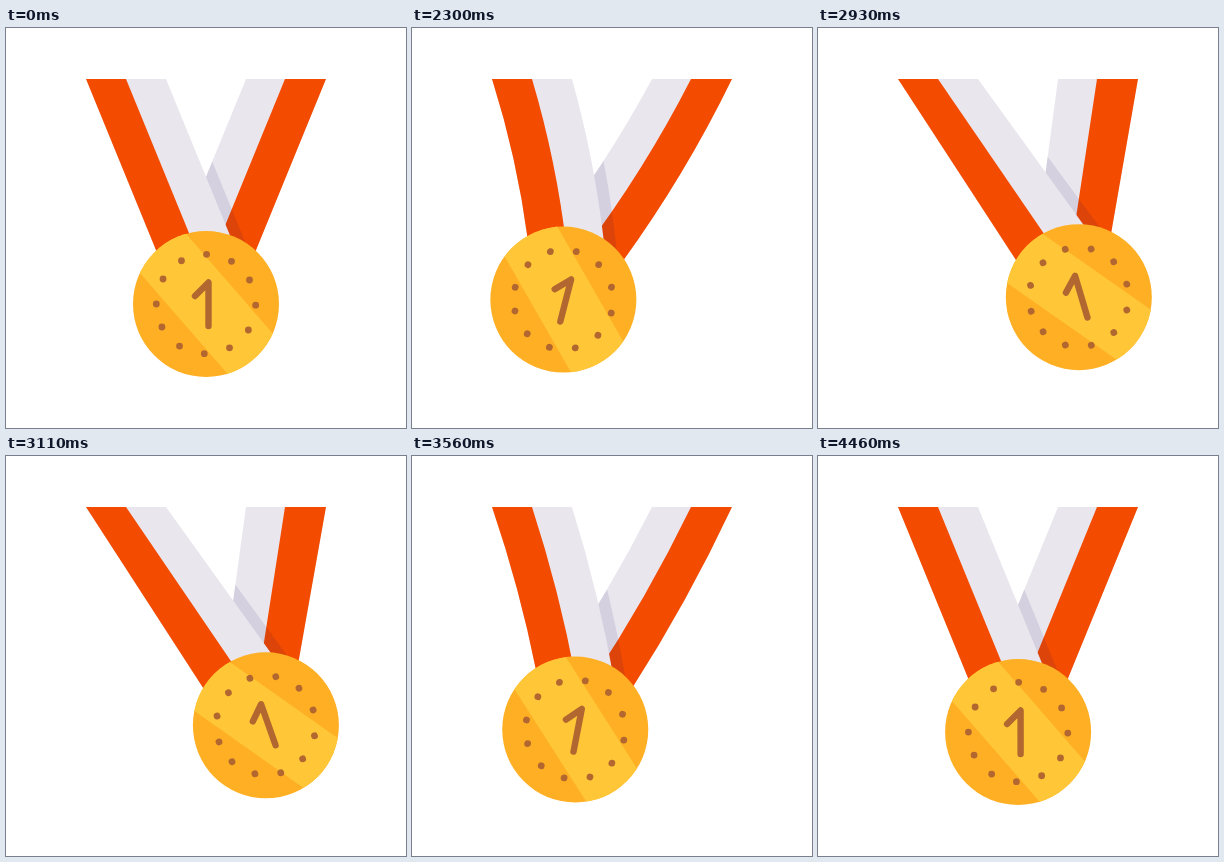
Write an HTML page with a canvas that moves like this. It is 400 px wide and 400 px high and loops after 4.49 s.

```html
<!DOCTYPE html>
<html>
<head>
<meta charset="utf-8">
<title>Swinging medal</title>
<style>
html, body { margin: 0; width: 100%; height: 100%; overflow: hidden; background: #fff; }
canvas { display: block; }
</style>
</head>
<body>
<canvas id="stage" width="400" height="400"></canvas>
<script>
const ctx = document.getElementById('stage').getContext('2d');
const LOOP = 4490, START = 2030, STEP = 30;
const TOP = 51, SLOPE = 0.409, RAD = Math.PI / 180;
const RED = '#f34b00', WHITE = '#eae6ed', SHADE = 'rgba(30,10,100,0.1)';
const GOLD = '#ffaf23', LIGHT = '#ffc738', BROWN = '#b1672f';

// [time, value]: sideways offset of the medal and, trailing it, the tilt of its face
const SWAY = [[1997, 0], [2594, -68], [3005, 72], [3495, -39], [3980, 12.5], [4490, 0]];
const TILT = [[1997, 0], [2620, 20.8], [3020, -21.6], [3560, 11], [4000, -3.9], [4490, 0]];

// The first leg starts with a push (ease out), the others ease in and out.
function valueAt(keys, t) {
  if (t < START) return 0;
  const i = Math.max(1, keys.findIndex(k => k[0] > t));
  const [t0, a] = keys[i - 1], [t1, b] = keys[i];
  const u = (t - t0) / (t1 - t0);
  const eased = i === 1 ? Math.sin(u * Math.PI / 2) : (1 - Math.cos(u * Math.PI)) / 2;
  return a + (b - a) * eased;
}

function draw(time) {
  const t = time < START ? 0 : time - (time - START) % STEP;
  const sway = valueAt(SWAY, t);
  const tilt = valueAt(TILT, t) * RAD;
  const hang = -0.275 * sway * RAD;
  const bow = 0.0009 * Math.max(0, -sway);
  const cx = 200 + sway, cy = 276 - sway * sway / 540;

  // Ribbon edge from the top to behind the medal, bowed on the left swing
  function edge(x, side) {
    const dx = x + side * SLOPE * 175 - 200, dy = -50;
    const ex = cx + dx * Math.cos(hang) - dy * Math.sin(hang);
    const ey = cy + dx * Math.sin(hang) + dy * Math.cos(hang);
    return {
      x, ex, ey,
      mx: (x + ex) / 2 + (ey - TOP) * bow,
      my: (TOP + ey) / 2 - (ex - x) * bow
    };
  }

  function strip(x0, x1, side) {
    const a = edge(x0, side), b = edge(x1, side), path = new Path2D();
    path.moveTo(a.x, TOP);
    path.quadraticCurveTo(a.mx, a.my, a.ex, a.ey);
    path.lineTo(b.ex, b.ey);
    path.quadraticCurveTo(b.mx, b.my, b.x, TOP);
    path.closePath();
    return path;
  }

  function fill(path, color) {
    ctx.fillStyle = color;
    ctx.fill(path);
  }

  ctx.clearRect(0, 0, 400, 400);

  fill(strip(240, 320, -1), WHITE);
  fill(strip(279, 320, -1), RED);
  ctx.save();
  ctx.clip(strip(240, 320, -1));
  fill(strip(150, 172.5, 1), SHADE);
  ctx.restore();
  fill(strip(80, 160, 1), WHITE);
  fill(strip(80, 120, 1), RED);

  ctx.save();
  ctx.translate(cx, cy);
  const disc = new Path2D();
  disc.arc(0, 0, 73, 0, 2 * Math.PI);
  fill(disc, GOLD);
  ctx.save();
  ctx.clip(disc);
  ctx.rotate((49 - 0.23 * sway) * RAD);
  ctx.fillStyle = LIGHT;
  ctx.fillRect(-80, -31, 160, 60.5);
  ctx.restore();

  ctx.rotate(tilt);
  ctx.fillStyle = ctx.strokeStyle = BROWN;
  for (let i = 0; i < 12; i++) {
    const a = (180 + i * 30.22) * RAD;
    ctx.beginPath();
    ctx.arc(49.7 * Math.cos(a), 49.7 * Math.sin(a), 3.4, 0, 2 * Math.PI);
    ctx.fill();
  }
  ctx.lineWidth = 6.4;
  ctx.lineCap = ctx.lineJoin = 'round';
  ctx.beginPath();
  ctx.moveTo(-11, -8);
  ctx.lineTo(2.5, -21.5);
  ctx.lineTo(2.5, 22);
  ctx.stroke();
  ctx.restore();
}

const begin = performance.now();
function frame() {
  draw((performance.now() - begin) % LOOP);
  requestAnimationFrame(frame);
}
frame();
</script>
</body>
</html>
```
